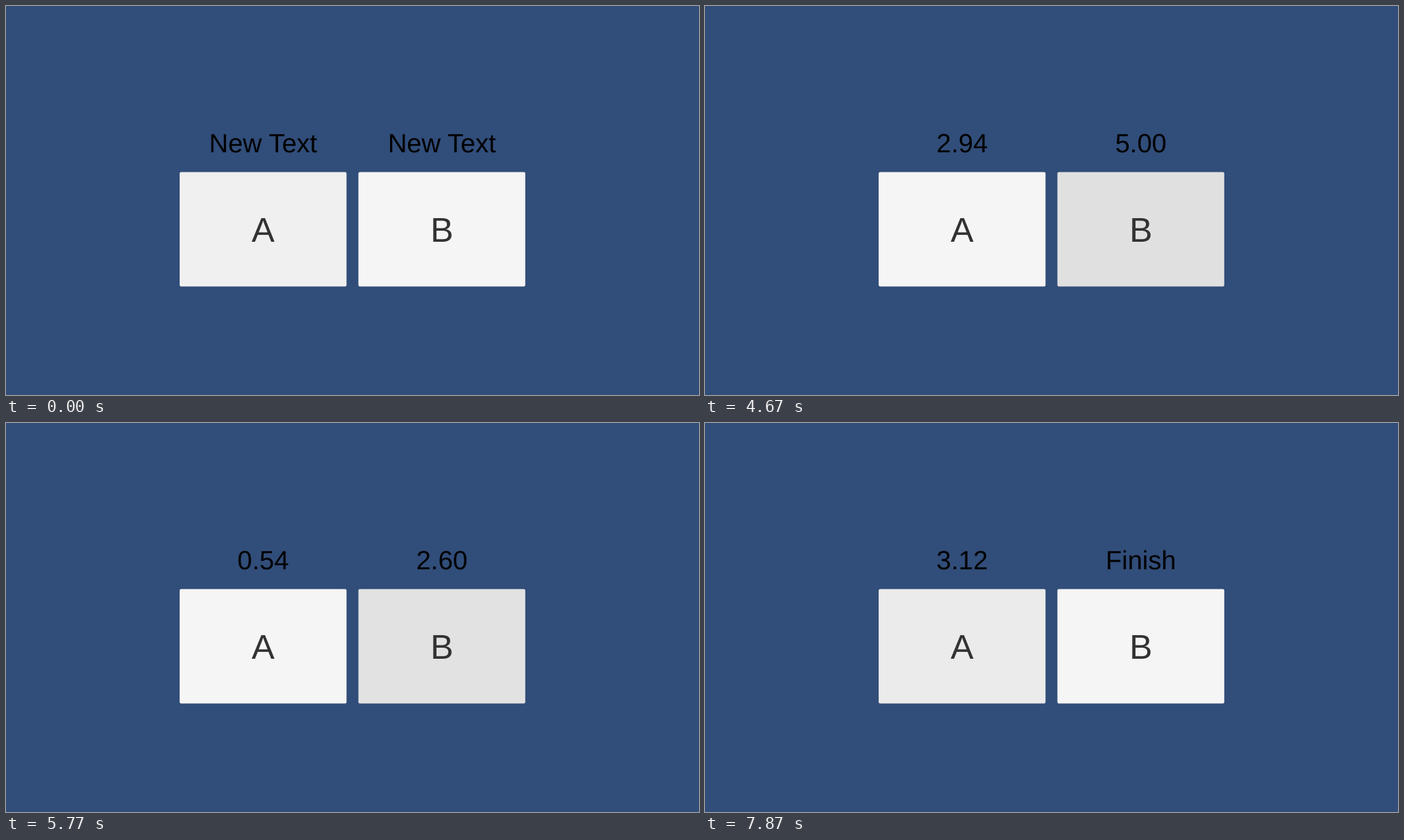
Write an HTML page that moves like this. It is 998 by 561 pixels and loops after 7.9 s.

```html
<!DOCTYPE html>
<html lang="en">
<head>
<meta charset="utf-8">
<title>Two countdown buttons</title>
<style>
  html, body { margin: 0; width: 100%; height: 100%; overflow: hidden; background: #314d79; }
  svg { display: block; width: 998px; height: 561px; }
  text {
    font-family: "Liberation Sans", Arial, sans-serif;
    text-anchor: middle;
    text-rendering: geometricPrecision;
  }
  .label { font-size: 38px; fill: #000; }
  .key { font-size: 49.5px; fill: #323232; }
</style>
</head>
<body>
<svg viewBox="0 0 998 561">
  <rect id="btnA" x="250.1" y="239.5" width="240.3" height="165" rx="2" fill="#f0f0f0"/>
  <rect id="btnB" x="507.5" y="239.5" width="240.3" height="165" rx="2" fill="#f5f5f5"/>
  <text class="label" id="labelA" x="370.3" y="210.5">New Text</text>
  <text class="label" id="labelB" x="627.7" y="210.5">New Text</text>
  <text class="key" x="370.3" y="339.5">A</text>
  <text class="key" x="627.7" y="339.5">B</text>
</svg>
<script>
const LOOP = 7900, TICK = 100 / 3;
const IDLE = 0xf5, DOWN = 0xc8;
const TAPS = [0xe0, DOWN, 0xdb]; // one rapid click lasts three ticks
const $ = id => document.getElementById(id);

// Ticks and the seconds elapsed on the game clock
const CLOCK = [[92, 0], [140, 3.53], [157, 4.76], [173, 5.93], [194, 7.53], [236, 10.69]];

function clock(k) {
  let i = 1;
  while (i < CLOCK.length - 1 && k > CLOCK[i][0]) i++;
  const [k0, s0] = CLOCK[i - 1], [k1, s1] = CLOCK[i];
  return s0 + (s1 - s0) * (k - k0) / (k1 - k0);
}

// Seconds left after a start, or the closing word
function countdown(k, start) {
  const left = 5 - (clock(k) - clock(start));
  return left > 0.02 ? left.toFixed(2) : "Finish";
}

// Every click on A restarts its countdown
function startA(k) {
  const [from, to] = k < 193 ? [94, 112] : [193, 211];
  return k >= to ? to : k - (k - from) % 3;
}

// Latest [tick, value] entry that has begun
const pick = (steps, k) => steps.filter(s => s[0] <= k).pop()[1];

const SHADE_A = [[0, 0xf0], [90, 0xdb], [92, DOWN], [94, TAPS], [113, IDLE],
                 [192, 0xe0], [193, TAPS], [212, 0xeb]];
const SHADE_B = [[0, IDLE], [138, 0xf0], [139, DOWN], [140, 0xe0], [141, 0xe2], [178, IDLE]];

function paint(id, shade) {
  $(id).setAttribute("fill", `rgb(${shade},${shade},${shade})`);
}

function draw(ms) {
  const k = Math.floor((ms + 3.5) / TICK);
  const a = pick(SHADE_A, k);
  paint("btnA", a === TAPS ? TAPS[(k - startA(k)) % 3] : a);
  paint("btnB", pick(SHADE_B, k));
  $("labelA").textContent = k < 94 ? "New Text" : countdown(k, startA(k));
  $("labelB").textContent = k < 140 ? "New Text" : countdown(k, 140);
}

const begin = performance.now();
function loop() {
  draw((performance.now() - begin) % LOOP);
  requestAnimationFrame(loop);
}
loop();
</script>
</body>
</html>
```
